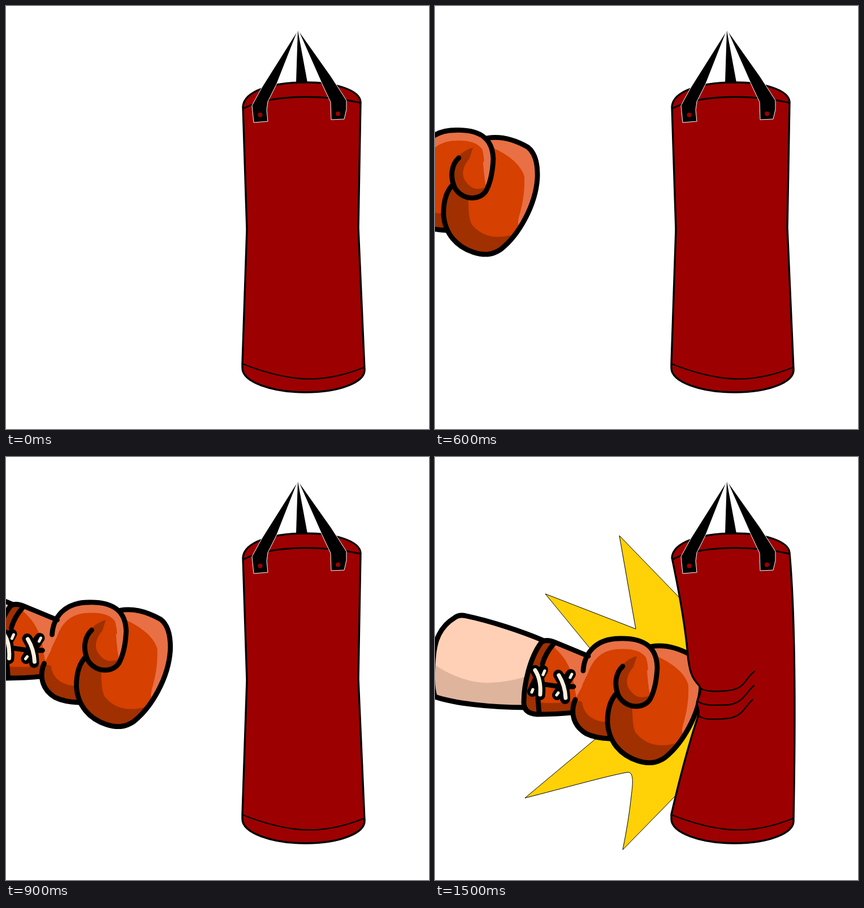
Write an HTML page that moves like this. It is 748 by 748 pixels and loops after 1.8 s.

```html
<!DOCTYPE html>
<html lang="en">
<head>
<meta charset="utf-8">
<title>Punching bag</title>
<style>
  html, body { margin: 0; width: 100%; height: 100%; overflow: hidden; background: #fff; }
  svg { display: block; width: 100vw; height: 100vh; }
  .ink { fill: none; stroke: #000; stroke-width: 8.8; stroke-linecap: round; stroke-linejoin: round; }
  .base { fill: #d64000; }
  .light { fill: #e87044; }
  .dark { fill: #a03000; }
  .lace { fill: none; stroke: #fff1e0; stroke-width: 5; stroke-linecap: round; }
  .knot { stroke-width: 18; }
  .bag { fill: #9d0000; stroke: #000; stroke-width: 3.4; stroke-linejoin: round; }
  .seam { fill: none; stroke: #000; stroke-width: 2.4; stroke-linecap: round; }
  .strap { stroke: #fff; stroke-width: 1; }
</style>
</head>
<body>
<svg viewBox="0 0 748 748">
  <path id="burst" fill="#ffd106" stroke="#000"
    d="M326 139L355 304L195 242L300 370V485L159 603C230 585 300 565 340 557.5C352 556 350 577 347 600Q343 640 332 694.5L480 543V298Z"/>

  <g id="punch">
    <!-- arm -->
    <path fill="#ffd0b5" d="M100 293C60 276 5 258 -38 249Q-50 246 -58 252C-84 268 -94 292 -96 325Q-100 372 -93 392C-60 403 0 411 70 411Z"/>
    <path fill="#deb49d" d="M-97 333C-60 360 -20 368 0 367.5C30 366 50 362 76 354L70 411C0 411 -60 403 -93 392Z"/>
    <path class="ink" d="M100 293C60 276 5 258 -38 249Q-50 246 -58 252C-84 268 -94 292 -96 325Q-100 372 -93 392C-60 403 0 411 70 411"/>

    <!-- cuff -->
    <path class="base" d="M95 296Q103 289 120 296L178 320L190 400L150 420L88 423Q64 422 64 402C64 370 75 322 95 296Z"/>
    <path class="dark" d="M95 296Q103 289 120 296C96 325 86 370 91 422Q64 424 64 402C64 370 75 322 95 296Z"/>
    <path class="dark" d="M90 402Q125 406 154 398L150 420L90 422Z"/>

    <!-- hand -->
    <path class="base" d="M169 346C171 316 190 289 234 289C280 288 300 308 300 345L240 470L216 466C178 465 151 447 150 420L155 396Z"/>
    <path class="dark" d="M155 398L167 401C170 425 188 437 216 437V466C178 465 151 447 150 420Z"/>
    <path class="light" d="M169 348C171 316 190 289 234 289C280 288 300 308 300 345L288 390C283 362 286 340 280 322C267 306 244 307 227 308C200 311 186 327 178 349L167 372Z"/>
    <path class="light" d="M120 298L176 321L169 348L178 349Q168 365 167 374L157 393L153 372C150 345 138 322 117 304Z"/>

    <!-- cuff lines and laces -->
    <path class="ink" d="M178 320L120 296Q103 289 95 296C75 322 64 370 64 402Q64 422 88 423Q125 423 150 420M118 297Q102 315 97 334M89 395L91 420M100 370L128 374M138 374H152"/>
    <path class="ink knot" d="M98 345Q88 362 79 383M84 345Q95 362 93 389M147 352Q136 368 123 389M125 353Q137 370 137 396"/>
    <path class="lace" d="M101 346L98 353M80 379L78 384M149 352L146 358M125 385L122 389"/>
    <path class="lace" style="stroke-width:7" d="M84 345Q95 362 93 388M126 354Q137 372 138 394"/>

    <!-- fingers -->
    <path class="base" d="M290 303C315 299 338 306 361 319C375 330 379 350 378 374C375 422 345 475 313 500C298 510 284 511 265 505C235 495 214 472 212 437C212 412 218 395 230 384C240 410 277 420 290 390C301 360 303 325 290 303Z"/>
    <path class="light" d="M290 303C315 299 338 306 361 319C375 330 379 350 378 374C376 405 363 436 347 460Q342 459 345 444C352 420 356 400 355 371C349 350 327 333 301 321Z"/>
    <path class="dark" d="M230 384Q240 409 256 410C256 438 258 449 263 457C282 479 307 482 339 473C321 494 304 509 284 509C250 506 214 480 212 437C212 412 218 395 230 384Z"/>
    <path class="ink" d="M290 303C315 299 338 306 361 319C375 330 379 350 378 374C375 422 345 475 313 500C298 510 284 511 265 505C235 495 214 472 212 437C212 412 218 395 230 384"/>

    <!-- thumb -->
    <path class="base" d="M239 338L282 360L287 384L289 393C280 414 246 415 232 391C223 371 226 350 239 338Z"/>
    <path class="light" d="M282 345L300 340C299 362 296 378 290 392L287 389Q283 365 282 345Z"/>
    <path class="dark" d="M264 320Q249 324 239 335C224 350 222 375 233 395C247 415 279 414 290 389Q270 397 259 388C241 373 244 356 258 339Z"/>
    <path class="ink" d="M169 346C171 316 190 289 234 289C280 288 299 306 300 340C299 362 296 378 289 393C280 414 246 415 232 391C223 371 226 350 239 338M155 397C145 422 153 444 174 457Q190 465 216 466"/>
  </g>

  <path id="bag" class="bag"/>
  <path class="seam" style="stroke-width:3" d="M420 181C470 156 560 156 626 171"/>
  <path class="seam" d="M419 633C500 665 560 669 633 639"/>
  <path id="creases" class="seam" d="M468 408C480 417 505 415 525 412C548 408 549 391 565 379M465 432C475 441 500 439 520 438C545 435 551 415 564 404M467 458C475 466 500 464 520 462C545 458 549 439 562 429"/>
  <path d="M516 43L513 135H533Z"/>
  <path class="strap" d="M516 43L453 143L435 176L438 206L463 204L461 184L463 169L479 137Z"/>
  <path class="strap" d="M517 43L559 138L574 170L575 201L598 200L602 183V167L575 125Z"/>
  <g fill="#9d0000"><circle cx="449.5" cy="192.5" r="4"/><circle cx="587" cy="190.5" r="4"/></g>
</svg>
<script>
const STEP = 300;
// Glove offset per step; null keeps it off stage.
const offsets = [null, [-327.5, -101.5], [-197, -69.5], [-87.5, -32], [0, 0], [93, 32]];
const HIT = offsets.length - 1;

const lid = "M419 178C421 150 470 135 530 135C580 135 626 148 627 170";
const bottom = "C636 665 590 683 530 683C470 683 418 665 418 640V632";
const restBag = lid + "L623 392L634 642" + bottom + "L426 395Z";
const hitBag = lid + "C636 270 638 430 634 642" + bottom +
  "C430 580 448 510 465 459Q468 450 464 440Q462 433 467 423Q472 412 467 404C455 392 450 380 447 350C443 300 432 240 419 178Z";

const get = id => document.getElementById(id);
const show = (el, on) => el.setAttribute("visibility", on ? "visible" : "hidden");
const punch = get("punch"), bag = get("bag"), burst = get("burst"), creases = get("creases");
let shown = -1;

function pose(i) {
  const at = offsets[i], hit = i === HIT;
  show(punch, at);
  if (at) punch.setAttribute("transform", `translate(${at})`);
  bag.setAttribute("d", hit ? hitBag : restBag);
  show(burst, hit);
  show(creases, hit);
}

const start = performance.now();
function tick() {
  const i = Math.floor((performance.now() - start) / STEP) % offsets.length;
  if (i !== shown) pose(shown = i);
  requestAnimationFrame(tick);
}
tick();
</script>
</body>
</html>
```
